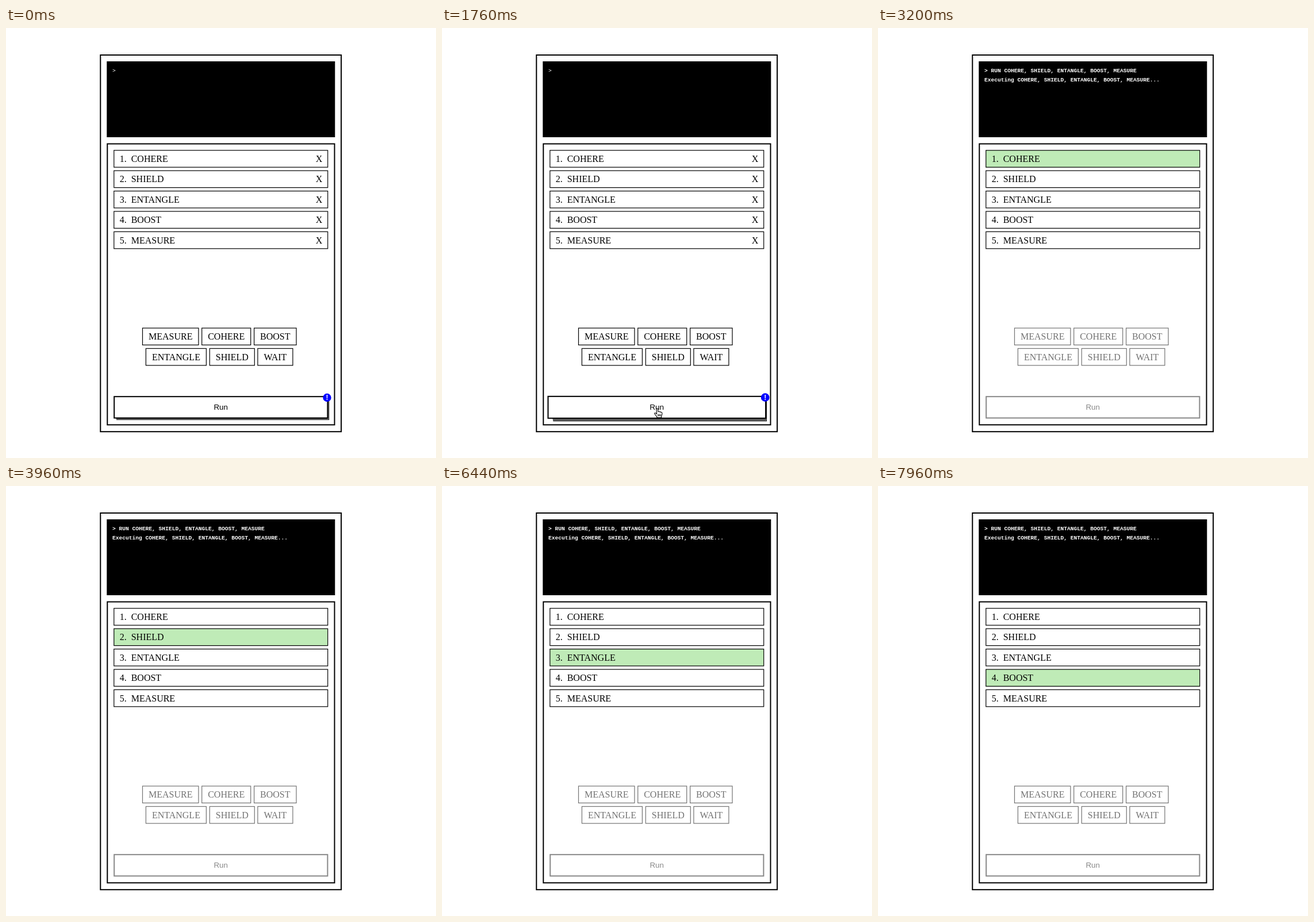
Animation, 748 px wide and 748 px high, one loop 8 s. Source, as an HTML page:

```html
<!DOCTYPE html>
<html lang="en">
<head>
<meta charset="utf-8">
<title>Command queue</title>
<style>
  html, body { margin: 0; width: 100%; height: 100%; overflow: hidden; background: #fff; }
  svg { display: block; width: 100vw; height: 100vh; }
  text { white-space: pre; }
  .box { fill: #fff; stroke: #000; stroke-width: 1.2; }
  .frame { fill: #fff; stroke: #000; stroke-width: 2; }
  .serif { font: 16px "Liberation Serif", serif; }
  .sans { font: 13.33px "Liberation Sans", sans-serif; text-anchor: middle; }
  .mono { font: 9.6px "Liberation Mono", monospace; fill: #fff; }
  .mono.busy { font-weight: bold; }
  .active .box { fill: #bfebb7; }
  .mark { font: bold 12px "Liberation Sans", sans-serif; fill: #fff; text-anchor: middle; }
</style>
</head>
<body>
<svg viewBox="0 0 748 748">
  <defs>
    <pattern id="shade" width="2" height="2" patternUnits="userSpaceOnUse">
      <path d="M0 0h2v2h-2z" fill="#fff"/>
      <path d="M0 0h.8v.8h-.8zM1 1h.8v.8h-.8z" fill="#333"/>
    </pattern>
  </defs>
  <rect class="frame" x="164.3" y="47" width="418.8" height="655.2"/>
  <rect x="175.3" y="58" width="397" height="132"/>
  <text id="line1" class="mono" x="185" y="77"></text>
  <text id="line2" class="mono busy" x="185" y="93"></text>
  <rect id="caret" y="69" width="6" height="10.3" fill="url(#shade)"/>
  <rect class="frame" x="176.3" y="201.5" width="395.2" height="488.8"/>
  <g id="queue"></g>
  <g id="palette"></g>
  <g id="shadow"></g>
  <g id="run">
    <rect id="runBox" class="frame" x="188.2" y="641.2" width="371.2" height="37.2"/>
    <text id="runText" class="sans" x="373.7" y="664.2">Run</text>
    <g id="badge">
      <circle cx="558.5" cy="643" r="7.2" fill="#00f"/>
      <text class="mark" x="558.5" y="647.2">!</text>
    </g>
  </g>
  <g id="pointer" stroke-linejoin="round">
    <path id="arrow" d="M0 0V14.2L3.2 11.2L5.6 16.7L8.1 15.6L5.8 10.3H10.2Z" stroke="#fff"/>
    <path id="hand" fill="#fff" stroke="#000" stroke-width="1.1"
      d="M-1.6 1.2Q-1.6 0 -.3 0Q.9 0 1 1.2L1.4 5.6Q2.6 4.6 3.8 6Q5 5.2 6 6.6Q8.2 6.2 8.3 8.2Q8.4 11 7 13.2V16H-.8V14.4Q-3 12 -4.8 9.2Q-5.2 7.6 -3.4 7.8L-1 9.6ZM1.3 10.2V13.4M3.3 10.2V13.4M5.3 10.2V13.4"/>
  </g>
</svg>
<script>
const $ = id => document.getElementById(id);
const LOOP = 8000, RUN = 2160, STEP = 1720, CHAR = 20;
const HOVER = 500, ENTER = 360, LEAVE = 2540;
const commands = ['COHERE', 'SHIELD', 'ENTANGLE', 'BOOST', 'MEASURE'];
const list = commands.join(', ');
const typed = 'RUN ' + list;

$('queue').innerHTML = commands.map((name, i) => `
  <g transform="translate(0 ${i * 35.4})">
    <rect class="box" x="187.8" y="212.8" width="371.9" height="29.4"/>
    <text class="serif" x="197.7" y="233">${i + 1}.</text>
    <text class="serif" x="217.7" y="233">${name}</text>
    <text class="serif remove" x="538.7" y="233">X</text>
  </g>`).join('');
const rows = [...$('queue').children];
const removers = document.querySelectorAll('.remove');

const chip = ([name, x, width], y) => `
  <rect class="box" x="${x}" y="${y}" width="${width}" height="29.4"/>
  <text class="serif" x="${x + width / 2}" y="${y + 20.2}" text-anchor="middle">${name}</text>`;
$('palette').innerHTML =
  [['MEASURE', 237.5, 97.4], ['COHERE', 340.7, 85], ['BOOST', 431.6, 73.4]].map(c => chip(c, 522)).join('') +
  [['ENTANGLE', 243.4, 105], ['SHIELD', 354.3, 78], ['WAIT', 437.9, 61]].map(c => chip(c, 557.5)).join('');

const clamp = v => Math.min(1, Math.max(0, v));
const mix = (a, b, p) => a + (b - a) * p;
const show = (el, on) => { el.style.display = on ? '' : 'none'; };

function drawShadow(lift) {
  const left = mix(192, 193.3, lift), right = mix(562.2, 565, lift), bottom = mix(681.8, 684.2, lift);
  $('shadow').innerHTML = [0, 1, 2, 3, 4].map(k => `
    <rect x="${left - k * .2}" y="${646 - k}" width="${right - left - k * .7}" height="${bottom - 646}"
      fill="${k % 2 ? '#aaa' : '#000'}"/>`).join('');
}

function drawPointer(t, running) {
  const visible = t >= ENTER && t < LEAVE;
  show($('pointer'), visible);
  if (!visible) return;
  const arrive = 1 - (1 - clamp((t - ENTER) / 400)) ** 2;
  const exit = clamp((t - 2380) / 160) ** 2;
  const settle = clamp((t - RUN) / 100);
  const y = mix(690, 661.8, arrive) + 6 * settle + 22 * exit;
  $('pointer').setAttribute('transform', `translate(${mix(374.6, 373.4, settle)} ${y})`);
  const hand = t >= HOVER && !running;
  show($('hand'), hand);
  show($('arrow'), !hand);
}

function drawTerminal(t, running) {
  const count = Math.floor((t - RUN - 20) / CHAR);
  const typing = running && count <= typed.length;
  const text = running ? typed.slice(0, Math.max(0, count)) : '';
  $('line1').textContent = '> ' + text;
  $('line1').classList.toggle('busy', running);
  $('line2').textContent = running && !typing ? `Executing ${list}...` : '';
  const blink = t >= 120 && (t - 120) % 1000 < 500;
  show($('caret'), running ? typing : blink);
  $('caret').setAttribute('x', 185 + 5.76 * (2 + text.length));
}

function draw(t) {
  const running = t >= RUN;
  const active = running ? Math.floor((t - RUN) / STEP) : -1;
  rows.forEach((row, i) => row.classList.toggle('active', i === active));
  removers.forEach(x => show(x, !running));
  $('palette').style.opacity = running ? .55 : 1;

  const p = clamp((t - HOVER) / 150);
  const lift = running ? 0 : p * p * (3 - 2 * p);
  const scale = 1 + .02 * lift;
  $('run').setAttribute('transform', `translate(373.75 659.6) scale(${scale}) translate(-373.75 -659.6)`);
  $('runBox').style.stroke = running ? '#888' : '#000';
  $('runText').style.fill = running ? '#888' : '#000';
  show($('badge'), !running);
  show($('shadow'), !running);
  if (!running) drawShadow(lift);

  drawTerminal(t, running);
  drawPointer(t, running);
}

const start = performance.now();
function tick() {
  draw((performance.now() - start) % LOOP);
  requestAnimationFrame(tick);
}
tick();
</script>
</body>
</html>
```
